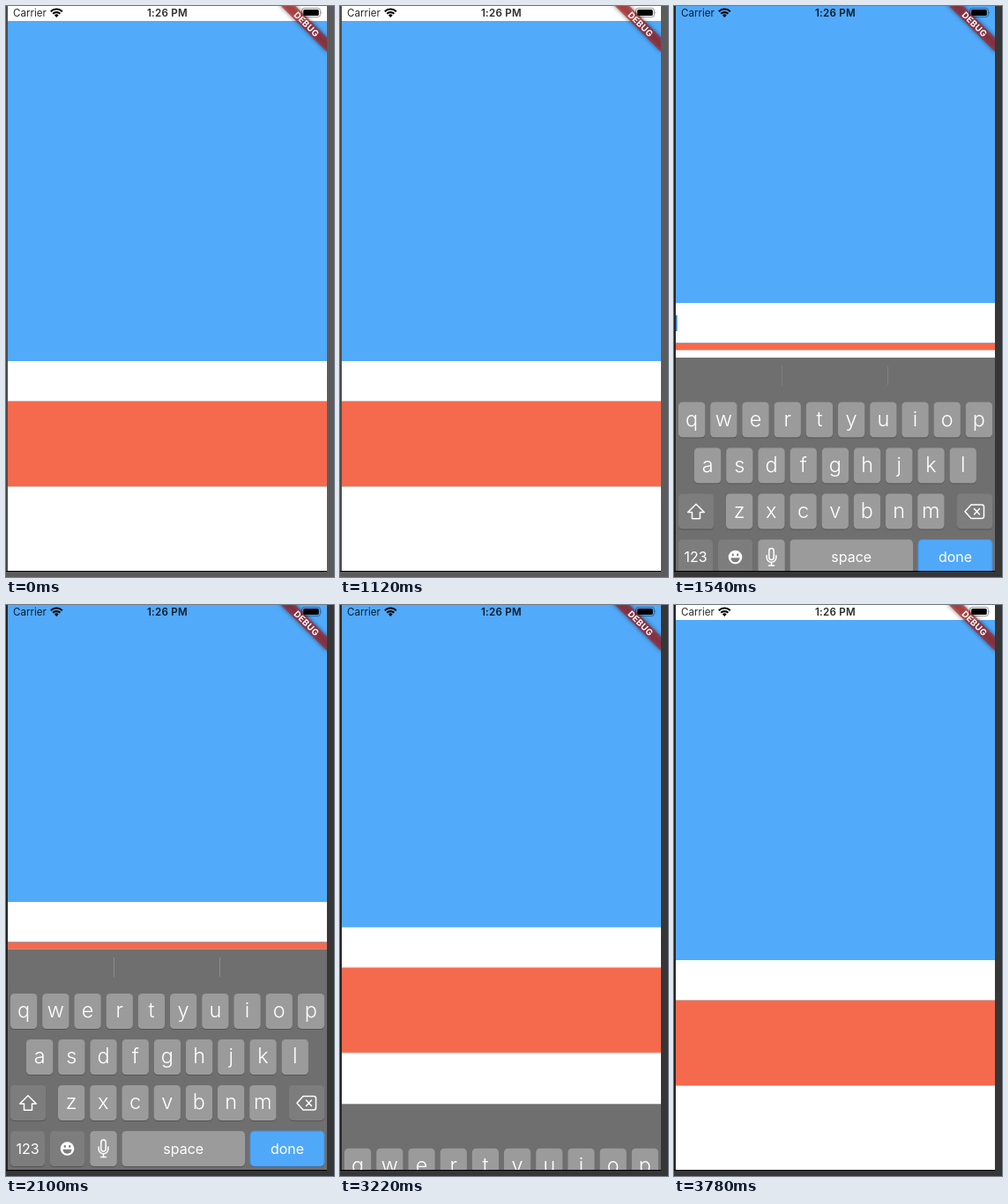
These frames come from a looping animation (372 by 648 pixels, 4.2 s). An HTML page:

```html
<!DOCTYPE html>
<html lang="en">
<head>
<meta charset="utf-8">
<title>Keyboard inset</title>
<style>
  html, body { margin: 0; width: 100%; height: 100%; overflow: hidden; background: #5b5b5b; }
  svg { display: block; width: 372px; height: 648px; font-family: Inter, Roboto, sans-serif; }
  .key { fill: #9b9b9b; }
  .dim { fill: #7d7d7d; }
  .done { fill: #50a8f9; stroke: #4090e6; }
  .letter { font-size: 23.5px; font-weight: 300; }
  .word { font-size: 16px; }
  #board text { fill: #fff; text-anchor: middle; }
  .icon { fill: none; stroke: #fff; stroke-width: 1.5; stroke-linejoin: round; stroke-linecap: round; }
</style>
</head>
<body>
<svg viewBox="0 0 372 648">
  <defs>
    <clipPath id="screen"><rect x="2" width="362" height="641"/></clipPath>
    <clipPath id="view"><rect id="viewport" x="2" width="362" height="641"/></clipPath>
    <filter id="blur" x="-30%" y="-100%" width="160%" height="300%"><feGaussianBlur stdDeviation="3"/></filter>
  </defs>
  <rect id="frame" width="372" height="648"/>
  <rect id="edge" width="2" height="641"/>
  <rect y="641" width="364" height="1"/>

  <g clip-path="url(#screen)">
    <rect x="2" width="362" height="641" fill="#fff"/>
    <g clip-path="url(#view)">
      <g id="content">
        <rect x="2" y="17" width="362" height="386" fill="#52aafa"/>
        <rect id="cursor" x="2" y="417" width="1.6" height="18" fill="#2f7fc8"/>
        <rect x="2" y="449" width="362" height="96.5" fill="#f5694d"/>
        <rect id="line" x="2" y="448" width="362" height="1"/>
        <rect x="2" y="545" width="362" height="1" fill="#d8c4be"/>
      </g>
    </g>

    <g id="board">
      <rect x="2" y="390.5" width="362" height="252" fill="#6f6f6f"/>
      <path id="bars" d="M122.5 400V422M242.5 400V422" stroke="#8c8c8c"/>
      <g id="keys"></g>
      <g class="icon">
        <path d="M25 556.8L34.3 566H29.5V573.2H20.5V566H15.7Z"/>
        <path d="M337 557.5H349Q351.5 557.5 351.5 560V570.5Q351.5 573 349 573H337L330 565.2ZM340.5 562L346.5 568.5M346.5 562L340.5 568.5"/>
        <rect x="107.8" y="607" width="5.4" height="13" rx="2.7"/>
        <path d="M105.2 615V617.5A5.3 5.3 0 0 0 115.8 617.5V615M110.5 623V626.5M107.5 626.5H113.5"/>
      </g>
      <circle cx="69.5" cy="617" r="7.8" fill="#fff"/>
      <g fill="#7d7d7d">
        <ellipse cx="66.8" cy="614.3" rx="1.1" ry="1.6"/>
        <ellipse cx="72.2" cy="614.3" rx="1.1" ry="1.6"/>
        <path d="M64.5 617.8H74.5A5 5 0 0 1 64.5 617.8Z"/>
      </g>
    </g>

    <g transform="translate(364 -2.5) rotate(45) scale(.965)">
      <rect x="-40" y="28" width="80" height="12" opacity=".5" filter="url(#blur)"/>
      <rect x="-40" y="28" width="80" height="12" fill="#b71c1c" fill-opacity=".627"/>
      <text y="37.7" fill="#fff" font-size="10.2" font-weight="700" text-anchor="middle" letter-spacing=".3">DEBUG</text>
    </g>

    <g fill="#000" fill-opacity=".84">
      <text x="8" y="12" font-size="11.6">Carrier</text>
      <text x="183" y="12" font-size="11.6" font-weight="600" text-anchor="middle" letter-spacing=".25">1:26 PM</text>
    </g>
    <g fill="none" stroke="#000" stroke-width="2.1">
      <path d="M50.8 6.2A9.2 9.2 0 0 1 63.8 6.2M53.2 8.8A5.8 5.8 0 0 1 61.4 8.8"/>
      <path d="M57.3 13L54.9 10.5A3.4 3.4 0 0 1 59.7 10.5Z" fill="#000" stroke="none"/>
    </g>
    <rect x="335.5" y="2.5" width="21" height="10" rx="2.8" fill="none" stroke="#000" stroke-opacity=".4"/>
    <rect x="337.2" y="4" width="17.6" height="7" rx="1.6"/>
    <path d="M357.6 5.7Q359.2 7.5 357.6 9.3Z" fill-opacity=".45"/>
  </g>
</svg>

<script>
const LOOP = 4200, STEP = 70;
const OPEN = 1255, CLOSE = 3086, SCROLL_IN = 1275, SCROLL_OUT = 3110;
const BOARD = 250.5, SHIFT = 66;
const $ = id => document.getElementById(id);
const set = (id, attrs) => {
  for (const k in attrs) $(id).setAttribute(k, attrs[k]);
};
const clamp = x => Math.min(1, Math.max(0, x));
const ramp = (t, from, to) => clamp((t - from) / (to - from));

function addKey(x, y, w, label = '', cls = 'key', font = 'word') {
  const base = y + (font === 'letter' ? 27 : 25.5);
  $('keys').insertAdjacentHTML('beforeend',
    `<rect x="${x}" y="${y + 1}" width="${w}" height="40" rx="4.5" fill="#555"/>
     <rect class="${cls}" x="${x}" y="${y}" width="${w}" height="40" rx="4.5"/>
     <text class="${font}" x="${x + w / 2}" y="${base}">${label}</text>`);
}

[['qwertyuiop', 5, 441], ['asdfghjkl', 23, 493], ['zxcvbnm', 59, 545]].forEach(([row, x, y]) =>
  [...row].forEach((c, i) => addKey(x + i * 36.2, y, 30.3, c, 'key', 'letter')));
addKey(5, 545, 40.3, '', 'dim');
addKey(321, 545, 40.3, '', 'dim');
addKey(5, 597, 39, '123', 'dim');
addKey(50, 597, 39.3, '', 'dim');
addKey(95.3, 597, 30.5);
addKey(131.5, 597, 139.5, 'space');
addKey(277, 597, 84, 'done', 'done');

// Critically damped spring: share of the way still to go.
function boardRest(ms) {
  const x = Math.max(0, ms) * 0.01826;
  return (1 + x) * Math.exp(-x);
}

// Overdamped scroll spring.
function scrollRest(ms) {
  const s = Math.max(0, ms) / 1000;
  return (22.03 * Math.exp(-9.08 * s) - 9.08 * Math.exp(-22.03 * s)) / 12.95;
}

function cursorAlpha(t) {
  if (t < OPEN || t >= SCROLL_OUT) return 0;
  const p = (t - 1350 + 1000) % 1000;
  return t < 1850 ? 1 : p < 500 ? ramp(p, 0, 250) : 1 - ramp(p, 500, 750);
}

function draw(t) {
  const open = t >= OPEN && t < SCROLL_OUT;
  const hidden = t < CLOSE ? boardRest(t - OPEN) : 1 - boardRest(t - CLOSE);
  const p = ramp(t, SCROLL_IN, SCROLL_IN + 100);
  const scroll = t < SCROLL_OUT ? p * p * (3 - 2 * p) : t < 3780 ? scrollRest(t - SCROLL_OUT) : 0;
  const dark = t >= 1190;

  set('board', { transform: `translate(0 ${(hidden * BOARD).toFixed(2)})`, visibility: t < OPEN || t >= 3640 ? 'hidden' : 'visible' });
  set('content', { transform: `translate(0 ${(-scroll * SHIFT).toFixed(2)})` });
  set('viewport', { height: open ? 390.5 : 641 });
  set('cursor', { opacity: cursorAlpha(t) });
  set('line', { fill: open ? '#9a9fb0' : '#c9b4ae' });
  set('bars', { opacity: ramp(t, 1400, 1640) * (1 - ramp(t, 2940, 3080)) });
  set('frame', { fill: dark ? '#363636' : '#5b5b5b' });
  set('edge', { fill: dark ? '#242424' : '#4a4a4a' });
}

const start = performance.now();
function tick() {
  const t = (performance.now() - start) % LOOP;
  draw(Math.floor(t / STEP) * STEP);
  requestAnimationFrame(tick);
}
tick();
</script>
</body>
</html>
```
